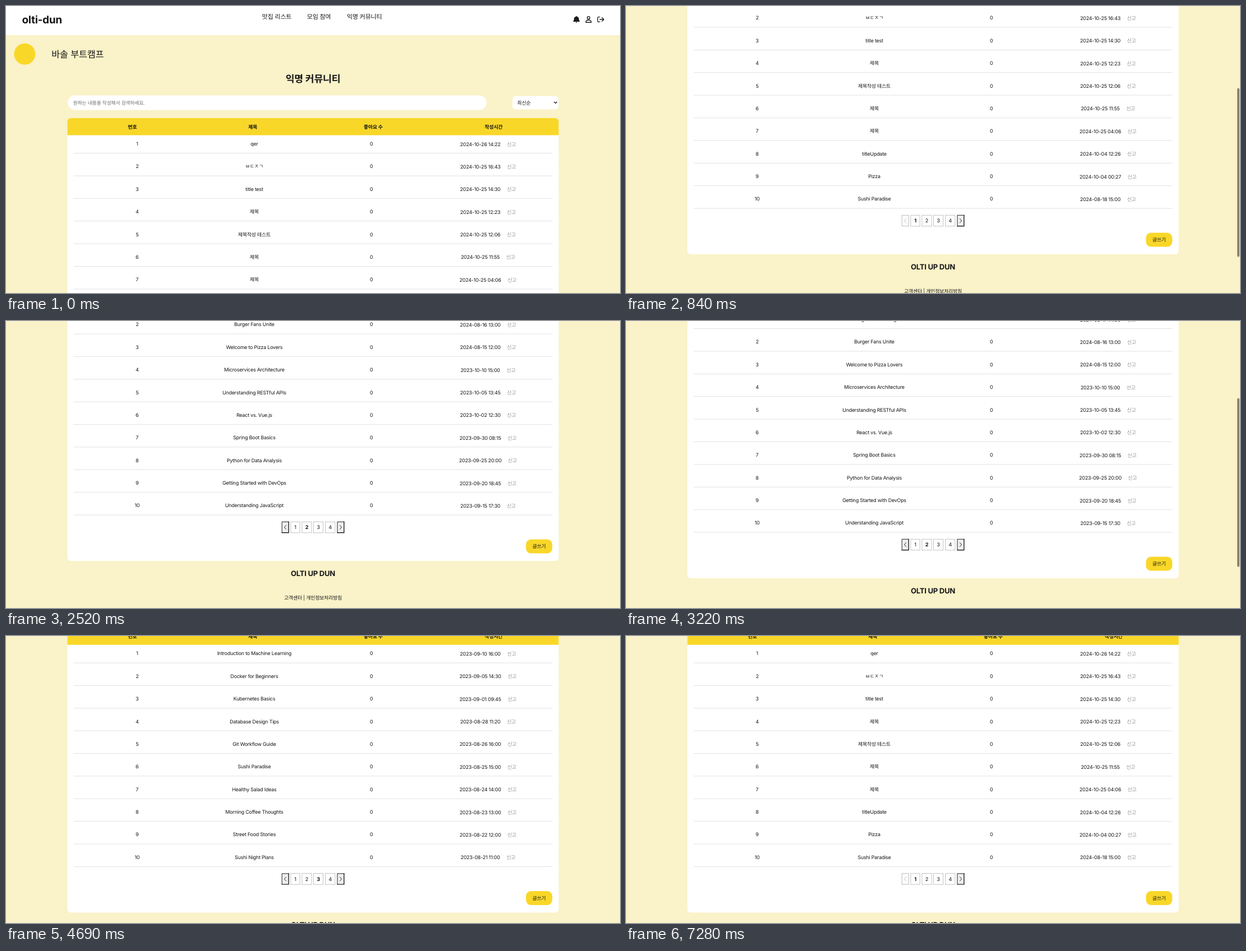
An HTML page that plays this animation: 1093x512 px, repeating every 8400 ms.

```html
<!DOCTYPE html>
<html lang="ko">
<head>
<meta charset="utf-8">
<title>익명 커뮤니티</title>
<style>
  @property --scroll { syntax: "<number>"; inherits: true; initial-value: 0; }
  html, body { margin: 0; width: 100%; height: 100%; overflow: hidden; background: #faf2c8; }
  svg {
    display: block; width: 1093px; height: 512px;
    font-family: Inter, "Noto Sans CJK KR", "Noto Sans CJK", sans-serif;
    letter-spacing: -.013em; text-rendering: geometricPrecision;
    animation: scroll 8400ms step-end infinite;
  }
  text { white-space: pre; }
  .icon { fill: none; stroke: #1c1c1c; stroke-width: 1.35; stroke-linecap: round; stroke-linejoin: round; }
  #doc { transform: translateY(calc(var(--scroll) * -1px)); }
  #thumb {
    fill: #000; fill-opacity: .46;
    transform: translateY(calc(var(--scroll) * .556px - .8px));
    animation: thumb 8400ms step-end infinite;
  }
  .page { opacity: 0; animation: 8400ms step-end infinite; }
  .page:nth-child(1) { animation-name: first; }
  .page:nth-child(2) { animation-name: second; }
  .page:nth-child(3) { animation-name: third; }
  .page:nth-child(4) { animation-name: fourth; }

  @keyframes scroll {
    0% { --scroll: 0; }
    5.83% { --scroll: 62; }
    6.66% { --scroll: 158; }
    7.49% { --scroll: 206; }
    8.33% { --scroll: 234; }
    9.16% { --scroll: 252; }
    9.99% { --scroll: 265; }
    10.83% { --scroll: 273; }
    11.66% { --scroll: 278; }
    12.49% { --scroll: 280; }
    37.49% { --scroll: 270; }
    38.33% { --scroll: 249; }
    39.16% { --scroll: 229; }
    39.99% { --scroll: 220; }
    41.66% { --scroll: 216; }
    42.49%, 100% { --scroll: 214.6; }
  }
  @keyframes thumb {
    0% { opacity: 0; }
    5.83% { opacity: 1; }
    19.16% { opacity: .66; }
    19.99% { opacity: .33; }
    20.83% { opacity: 0; }
    37.49% { opacity: 1; }
    49.99% { opacity: .66; }
    50.83% { opacity: .33; }
    51.66%, 100% { opacity: 0; }
  }
  @keyframes first { 0% { opacity: 1; } 29.99% { opacity: 0; } 86.66%, 100% { opacity: 1; } }
  @keyframes second { 0% { opacity: 0; } 29.99% { opacity: 1; } 55.83%, 100% { opacity: 0; } }
  @keyframes third { 0% { opacity: 0; } 55.83% { opacity: 1; } 68.33%, 100% { opacity: 0; } }
  @keyframes fourth { 0% { opacity: 0; } 68.33% { opacity: 1; } 86.66%, 100% { opacity: 0; } }
</style>
</head>
<body>
<svg viewBox="0 0 1093 512">
  <g id="doc">
    <g id="lists"></g>
    <g id="masthead"></g>
  </g>
  <rect id="thumb" x="1088" width="4" height="301" rx="2"/>
</svg>
<script>
const BODY = 8.9, PITCH = 40.38, YELLOW = '#f9d729';

const pages = [
  [
    ['qer', '2024-10-26 14:22'],
    ['ㅂㄷㅈㄱ', '2024-10-25 16:43'],
    ['title test', '2024-10-25 14:30'],
    ['제목', '2024-10-25 12:23'],
    ['제목작성 테스트', '2024-10-25 12:06'],
    ['제목', '2024-10-25 11:55'],
    ['제목', '2024-10-25 04:06'],
    ['titleUpdate', '2024-10-04 12:26'],
    ['Pizza', '2024-10-04 00:27'],
    ['Sushi Paradise', '2024-08-18 15:00'],
  ],
  [
    ['Morning Coffee Thoughts', '2024-08-17 14:00'],
    ['Burger Fans Unite', '2024-08-16 13:00'],
    ['Welcome to Pizza Lovers', '2024-08-15 12:00'],
    ['Microservices Architecture', '2023-10-10 15:00'],
    ['Understanding RESTful APIs', '2023-10-05 13:45'],
    ['React vs. Vue.js', '2023-10-02 12:30'],
    ['Spring Boot Basics', '2023-09-30 08:15'],
    ['Python for Data Analysis', '2023-09-25 20:00'],
    ['Getting Started with DevOps', '2023-09-20 18:45'],
    ['Understanding JavaScript', '2023-09-15 17:30'],
  ],
  [
    ['Introduction to Machine Learning', '2023-09-10 16:00'],
    ['Docker for Beginners', '2023-09-05 14:30'],
    ['Kubernetes Basics', '2023-09-01 09:45'],
    ['Database Design Tips', '2023-08-28 11:20'],
    ['Git Workflow Guide', '2023-08-26 16:00'],
    ['Sushi Paradise', '2023-08-25 15:00'],
    ['Healthy Salad Ideas', '2023-08-24 14:00'],
    ['Morning Coffee Thoughts', '2023-08-23 13:00'],
    ['Street Food Stories', '2023-08-22 12:00'],
    ['Sushi Night Plans', '2023-08-21 11:00'],
  ],
  [
    ['Best Pizza Toppings', '2023-08-20 10:00'],
    ['Ice Cream Lovers', '2023-08-19 16:00'],
    ['New Burger Recipe', '2023-08-18 15:00'],
    ['Pizza vs. Pasta', '2023-08-17 14:00'],
    ['Burger Fans Unite', '2023-08-16 13:00'],
    ['Burger Fans Unite', '2023-08-16 13:00'],
    ['Welcome to Pizza Lovers', '2023-08-15 12:00'],
    ['Welcome to Pizza Lovers', '2023-08-15 12:00'],
  ],
];

// y is the visual middle of the line
const text = (x, y, content, { size = BODY, weight = 400, anchor = 'middle', fill = '#151515' } = {}) =>
  `<text x="${x}" y="${y + size * .365}" font-size="${size}" font-weight="${weight}"
    text-anchor="${anchor}" fill="${fill}">${content}</text>`;

const rect = (x, y, width, height, rx, fill, extra = '') =>
  `<rect x="${x}" y="${y}" width="${width}" height="${height}" rx="${rx}" fill="${fill}" ${extra}/>`;

const path = (d, extra = '') => `<path d="${d}" ${extra}/>`;

function row([title, date], i) {
  const y = 245.8 + i * PITCH;
  const stamp = `${date}<tspan dx="11.5" fill="#8f8f8f">신고</tspan>`;
  return text(233.5, y, i + 1) + text(442, y, title) + text(650.5, y, 0) +
    text(858, y + .5, stamp) +
    rect(120.5, y + 16.3, 852, 1, 0, '#e2e2e2');
}

function arrowButton(x, y, direction, enabled) {
  const w = 13, h = 20.4, mid = x + w / 2, tip = 1.7 * direction;
  const chevron = path(`M${mid - tip} ${y + 6.4}l${2 * tip} 3.8l${-2 * tip} 3.8`,
    `fill="none" stroke="${enabled ? '#111' : '#bdbdbd'}" stroke-width=".9"`);
  if (!enabled) {
    return rect(x + .5, y + .5, w - 1, h - 1, 0, '#fcfcfc', 'stroke="#bcbcbc"') + chevron;
  }
  return rect(x, y, w, h, 0, '#efefef') +
    path(`M${x + .6} ${y + h}V${y + .6}H${x + w}`, 'fill="none" stroke="#4c4c4c" stroke-width="1.2"') +
    path(`M${x} ${y + h - .6}H${x + w - .6}V${y}`, 'fill="none" stroke="#000" stroke-width="1.2"') + chevron;
}

function pager(current, y) {
  const boxes = [[506.5, 17], [526.5, 18], [547, 18], [568, 18.2]];
  const numbers = boxes.map(([x, w], i) =>
    rect(x + .4, y + .4, w - .8, 19.6, 0, '#fff', 'stroke="#b4b4b4" stroke-width=".8"') +
    text(x + w / 2, y + 10.3, i + 1, { size: 9.1, weight: i === current ? 700 : 400 }));
  return arrowButton(490.7, y, -1, current > 0) + numbers.join('') +
    arrowButton(589.3, y, 1, current < pages.length - 1);
}

function listPage(rows, index) {
  const end = 262.6 + (rows.length - 1) * PITCH;
  const bottom = end + 82;
  return `<g class="page">
    ${rect(109.3, 200, 874.5, bottom - 200, 6, '#fff')}
    ${rows.map(row).join('')}
    ${pager(index, end + 11.8)}
    ${rect(925.6, end + 43.6, 46.8, 25, 9, YELLOW)}
    ${text(949, end + 56.2, '글쓰기')}
    ${text(546.5, bottom + 22, 'OLTI UP DUN', { size: 13, weight: 700 })}
    ${text(546.5, bottom + 66, '고객센터 | 개인정보처리방침')}
    ${text(546.5, bottom + 93.5, '평일 토요일 9:00 ~ 18:00')}
  </g>`;
}

function masthead() {
  const nav = { size: 11 };
  const bold = { weight: 700 };
  return rect(0, 0, 1093, 52, 0, '#fff') +
    text(28.5, 24.3, 'olti-dun', { size: 18.8, weight: 700, anchor: 'start' }) +
    text(482, 19, '맛집 리스트', nav) + text(557, 19, '모임 참여', nav) + text(638, 19, '익명 커뮤니티', nav) +
    path('M1015.5 18a1 1 0 0 1 1 .9c2.4.5 3.4 2.3 3.4 4.2 0 2.4.7 3 1.3 3.8.4.6.1 1.2-.6 1.2h-10.2c-.7 0-1-.6-.6-1.2.6-.8 1.3-1.4 1.3-3.8 0-1.9 1-3.7 3.4-4.2a1 1 0 0 1 1-.9zM1014 28.8h3a1.5 1.3 0 0 1-3 0z', 'fill="#1c1c1c"') +
    path('M1039.4 21a2.4 2.4 0 1 0-4.8 0a2.4 2.4 0 1 0 4.8 0M1032.2 29.2c0-2.6 1.9-4 4-4h1.6c2.1 0 4 1.4 4 4z', 'class="icon"') +
    path('M1057 19.6h-2.2a1.5 1.5 0 0 0-1.5 1.5v5.8a1.5 1.5 0 0 0 1.5 1.5h2.2M1057.2 24h6.6M1061 20.8l3.2 3.2-3.2 3.2', 'class="icon"') +
    `<circle cx="33.3" cy="85.8" r="19" fill="${YELLOW}"/>` +
    text(81, 86, '바솔 부트캠프', { size: 16.3, anchor: 'start' }) +
    text(546.5, 129.7, '익명 커뮤니티', { size: 17.2, weight: 700 }) +
    rect(110, 159.5, 745.5, 26, 13, '#fff') +
    text(119.5, 172.5, '원하는 내용을 작성해서 검색하세요.', { size: 8.8, anchor: 'start', fill: '#707070' }) +
    rect(901.6, 160.5, 82.2, 24, 6, '#fff') +
    text(910, 172.5, '최신순', { anchor: 'start' }) +
    path('M976 171.2l2.3 2.4 2.3-2.4', 'class="icon"') +
    path('M109.3 230.4V206a6 6 0 0 1 6-6h862.5a6 6 0 0 1 6 6v24.4z', `fill="${YELLOW}"`) +
    text(225, 215.3, '번호', bold) + text(439.3, 215.3, '제목', bold) +
    text(653.7, 215.3, '좋아요 수', bold) + text(868, 215.3, '작성시간', bold);
}

document.getElementById('lists').innerHTML = pages.map(listPage).join('');
document.getElementById('masthead').innerHTML = masthead();
</script>
</body>
</html>
```
